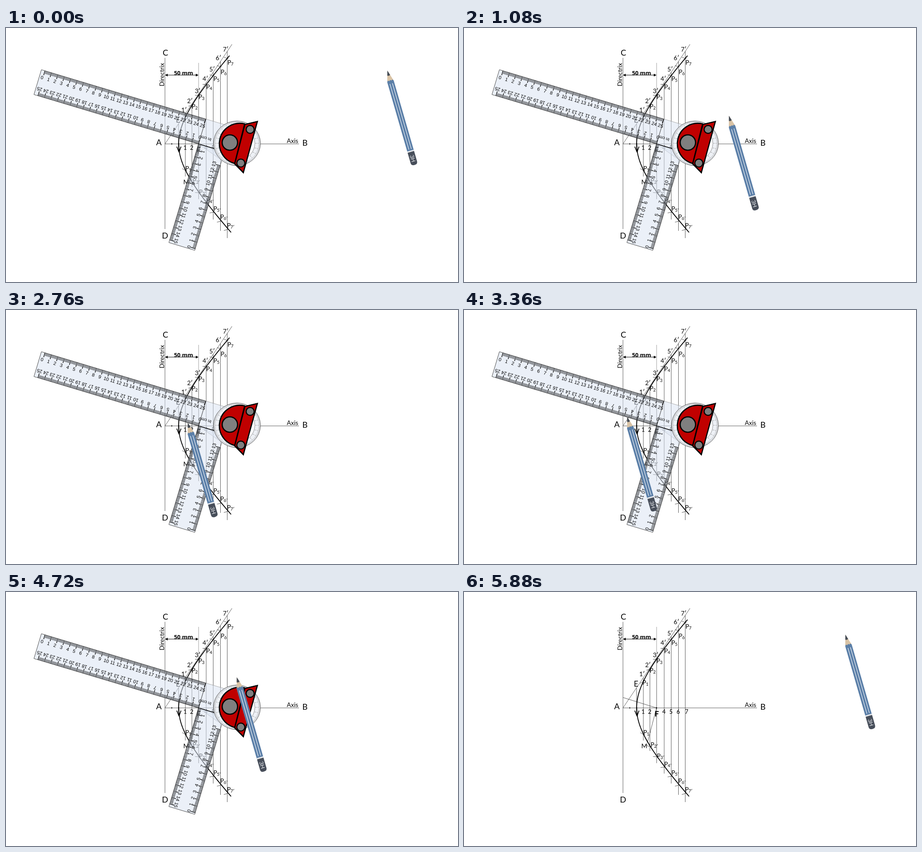
Write an HTML page with a canvas that moves like this. It is 998 by 561 pixels and loops after 5.92 s.

```html
<!DOCTYPE html>
<html lang="en">
<head>
<meta charset="utf-8">
<title>Hyperbola construction</title>
<style>
html, body { margin: 0; width: 100%; height: 100%; overflow: hidden; background: #fff; }
canvas { display: block; width: 998px; height: 561px; }
</style>
</head>
<body>
<canvas id="stage"></canvas>
<script>
const W = 998, H = 561, LOOP = 5920, TOOLS_OFF = 5860;
const TILT = Math.atan(0.3);
const AXIS = 256, DIRECTRIX = 351, FOCUS = 425, ECC = 1.45;
const LABEL = 'Lato, Carlito, sans-serif';
const MARKS = 'Liberation Sans, Arial, sans-serif';

const canvas = document.getElementById('stage');
const ctx = canvas.getContext('2d');
const dpr = window.devicePixelRatio || 1;
canvas.width = W * dpr;
canvas.height = H * dpr;

// Pencil tip: home -> focus -> along the ruler edge to the directrix -> home
const HOME = [842, 94];
const moves = [
  { start: 117, from: HOME, to: [425, 256] },
  { start: 2075, from: [425, 256], to: [351, 233] },
  { start: 4032, from: [351, 233], to: HOME }
];
const MOVE_TIME = 1715;

function ease(u) {
  return u < 0.5 ? 2 * u * u : 1 - 2 * (1 - u) * (1 - u);
}

function tipAt(t) {
  let tip = HOME;
  for (const { start, from, to } of moves) {
    if (t < start) break;
    const k = ease(Math.min(1, (t - start) / MOVE_TIME));
    tip = [from[0] + (to[0] - from[0]) * k, from[1] + (to[1] - from[1]) * k];
  }
  return tip;
}

function trace(points) {
  ctx.beginPath();
  points.forEach(([x, y], i) => i ? ctx.lineTo(x, y) : ctx.moveTo(x, y));
}

function line(x1, y1, x2, y2, color = '#333', width = 0.8) {
  trace([[x1, y1], [x2, y2]]);
  ctx.strokeStyle = color;
  ctx.lineWidth = width;
  ctx.stroke();
}

function shape(points, fill, stroke, width = 1) {
  trace(points);
  ctx.closePath();
  paint(fill, stroke, width);
}

function paint(fill, stroke, width) {
  if (fill) { ctx.fillStyle = fill; ctx.fill(); }
  if (stroke) { ctx.strokeStyle = stroke; ctx.lineWidth = width; ctx.stroke(); }
}

function disc(x, y, r, fill, stroke, width) {
  ctx.beginPath();
  ctx.arc(x, y, r, 0, Math.PI * 2);
  paint(fill, stroke, width);
}

function text(str, x, y, size, { font = LABEL, align = 'center', turn = 0, color = '#000', weight = '' } = {}) {
  ctx.save();
  ctx.translate(x, y);
  ctx.rotate(turn);
  ctx.font = `${weight} ${size}px ${font}`;
  ctx.textAlign = align;
  ctx.textBaseline = 'alphabetic';
  ctx.fillStyle = color;
  ctx.fillText(str, 0, size * 0.36);
  ctx.restore();
}

// Half height of the hyperbola at x
function reach(x) {
  const r = ECC * (x - DIRECTRIX), d = x - FOCUS;
  return Math.sqrt(Math.max(0, r * r - d * d));
}

function branch(side, end) {
  const x0 = (FOCUS + ECC * DIRECTRIX) / (1 + ECC), points = [];
  for (let i = 0; i <= 40; i++) {
    const x = x0 + (end - x0) * (i / 40) ** 2;
    points.push([x, AXIS + side * reach(x)]);
  }
  trace(points);
  paint(null, '#000', 1.8);
}

// x, foot of the ordinate, label n' (x, y), label P (x, y), lower label P' (x, y)
const ordinates = [
  [396, 328, 393, 181, 394, 200, 396, 310],
  [410.5, 351, 406, 161, 410, 173, 412, 337],
  [425.3, 378, 423, 139, 425, 152, 426, 362],
  [442, 401, 440, 112, 442, 130, 442, 380],
  [457.5, 423, 455, 91, 458, 112, 458, 399],
  [473.5, 448, 469, 66, 474, 97, 473, 417],
  [488.5, 464, 485, 47, 489, 76, 488, 436]
];

function pointLabel(x, y, sub) {
  text('P', x, y, 13.5, { align: 'left' });
  text(sub, x + 7.8, y + 4, 9.5, { align: 'left' });
}

function cutArc(x, side) {
  const dx = x - FOCUS, dy = side * reach(x);
  const r = Math.hypot(dx, dy), a = Math.atan2(dy, dx);
  const back = side * 8 / r, ahead = -side * 3 / r;
  ctx.beginPath();
  ctx.arc(FOCUS, AXIS, r, a + Math.min(back, ahead), a + Math.max(back, ahead));
  paint(null, '#333', 0.8);
}

function drawing() {
  line(DIRECTRIX, 66, DIRECTRIX, 444);
  line(DIRECTRIX, AXIS, 647, AXIS);
  line(DIRECTRIX, AXIS, 499, 36);
  line(381, 212, 381, 258);
  line(DIRECTRIX, 233, FOCUS, AXIS);
  line(FOCUS, AXIS, 405, 333);
  line(425.3, 77, 425.3, 150, '#888');

  ordinates.forEach(([x, foot, nx, ny, px, py, qx, qy], i) => {
    const n = i + 1;
    line(x, AXIS - 1.486 * (x - DIRECTRIX), x, foot);
    cutArc(x, -1);
    cutArc(x, 1);
    text(n + '′', nx, ny, 13.5);
    pointLabel(px, py, String(n));
    pointLabel(qx, qy, n + '′');
    if (n !== 3) text(String(n), x + (n > 6 ? 3 : -0.5), 264, 13);
  });

  ctx.lineJoin = 'round';
  branch(-1, 493.5);
  ctx.save();
  ctx.translate(0, AXIS);
  ctx.scale(1, 0.982);
  ctx.translate(0, -AXIS);
  branch(1, 497);
  ctx.restore();
  line(381.3, 254, 382, 274, '#000', 1.8);
  trace([[377, 262], [382, 274], [386.5, 262]]);
  paint(null, '#000', 1.8);

  line(353, 104, 423, 104, '#000', 1);
  shape([[351, 104], [357, 101], [357, 107]], '#000');
  shape([[425, 104], [419, 101], [419, 107]], '#000');
  disc(366, AXIS, 1.2, '#000');
  disc(FOCUS, AXIS, 1.4, '#000');

  text('50 mm', 392, 99, 12.5, { font: 'Open Sans, sans-serif', weight: 'bold' });
  text('Directrix', 344, 103, 13.5, { turn: -Math.PI / 2 });
  text('Axis', 632.5, 249, 13.5);
  text('A', 337.5, 253, 18);
  text('B', 660, 254, 18);
  text('C', 352, 55, 18);
  text('D', 351, 459, 18);
  text('E', 380, 203, 17);
  text('F', 425.5, 268.5, 17, { weight: 'bold' });
  text('M', 398, 340, 14);
}

// A scale running along +x from the origin, ticks growing toward "grow"
function scale(cm, unit, grow, numberAt, shift, turn = 0) {
  for (let i = 0; i <= cm * 5; i++) {
    const len = i % 5 ? 6.5 : 10;
    line(i * unit / 5, 0, i * unit / 5, grow * len, '#000', i % 5 ? 1.1 : 1.4);
  }
  for (let n = 0; n <= cm; n++) {
    text(String(n), n * unit + shift, numberAt, 10.5, { font: MARKS, turn });
  }
}

function placed(x, y, turn, draw) {
  ctx.save();
  ctx.translate(x, y);
  ctx.rotate(turn);
  draw();
  ctx.restore();
}

function rulers() {
  const glass = 'rgba(218,227,243,0.55)';
  placed(FOCUS, AXIS, TILT, () => {
    shape([[0, -57.3], [60, -57.3], [60, 20], [59.5, 20], [0, 0]], glass, '#888', 0.6);
    shape([[-379.3, -57.3], [0, -57.3], [0, 0], [-379.3, 0]], glass, '#333', 0.8);
    shape([[0, 0], [59.7, 0], [59.7, 227.5], [0, 227.5]], glass, '#333', 0.8);
    line(0, 0, 40, 0, '#000', 1.4);

    placed(-371, -57.3, 0, () => scale(25, 14.8, 1, 16, -2));
    placed(0, 0, Math.PI, () => scale(25, 14.8, 1, 15, 1));
    text('In cm', 13, -16.5, 9.5, { font: MARKS, turn: Math.PI });
    placed(0, 0, Math.PI / 2, () => {
      for (let i = 1; i <= 75; i++) {
        line(i * 2.95, 0, i * 2.95, i % 5 ? -6.5 : -10, '#000', i % 5 ? 1.1 : 1.4);
      }
      for (let n = 1; n <= 15; n++) text(String(n), n * 14.7 - 1, -14.5, 10.5, { font: MARKS });
    });
    placed(59.7, 223.5, -Math.PI / 2, () => scale(13, 14.7, -1, -14.7, 0));
  });
}

function head() {
  ctx.save();
  ctx.translate(510, 254.7);
  ctx.scale(1, 0.952);
  disc(0, 0, 51.8, '#eef1f6', '#555', 1);
  for (let i = 0; i < 120; i++) {
    const a = i * Math.PI / 60, r = i % 5 ? 47.5 : 45;
    const c = Math.cos(a), s = Math.sin(a);
    line(c * r, s * r, c * 51, s * 51, '#888', 0.7);
    if (i % 5 === 0) line(c * 41, s * 41, c * 43, s * 43, '#999', 1.4);
  }
  disc(0, 0, 39.5, '#fbfcfe', '#777', 0.8);
  ctx.restore();

  ctx.lineJoin = 'miter';
  const a = Math.atan2(-44, 11);
  ctx.beginPath();
  ctx.arc(516, 255.5, 45, a + Math.PI, a + Math.PI * 2);
  ctx.closePath();
  paint('#c00000', '#000', 2.6);
  shape([[527.5, 213], [555, 206.5], [524, 319.5], [505, 300]], '#c00000', '#000', 2.6);
  disc(494.3, 253, 17, '#7f7f7f', '#000', 2.6);
  disc(539, 224, 8.8, '#7f7f7f', '#000', 2.4);
  disc(518.5, 298.3, 8.8, '#7f7f7f', '#000', 2.4);
}

// Drawn with the tip at the origin and the body running along +y
function pencil([x, y]) {
  placed(x, y, -0.281, () => {
    shape([[0, 0], [7.4, 25], [-7.4, 25]], '#d9c3a5');
    shape([[0, 0], [3.3, 11], [0, 12], [-3.3, 11]], '#454c55');
    ctx.beginPath();
    ctx.moveTo(-7.4, 25);
    ctx.quadraticCurveTo(-5, 20, -2.5, 24);
    ctx.quadraticCurveTo(0, 20, 2.5, 24);
    ctx.quadraticCurveTo(5, 20, 7.4, 25);
    ctx.lineTo(7.4, 185);
    ctx.lineTo(-7.4, 185);
    ctx.closePath();
    paint('#5b7fa8');
    line(-2.7, 30, -2.7, 181, '#e9eef4', 1.3);
    line(2.9, 30, 2.9, 181, '#e9eef4', 1.3);
    ctx.fillStyle = '#e4e7eb';
    ctx.fillRect(-7.4, 184, 14.8, 3);
    ctx.beginPath();
    ctx.moveTo(-7.4, 187);
    ctx.lineTo(7.4, 187);
    ctx.lineTo(7.4, 211);
    ctx.quadraticCurveTo(7.4, 217, 0, 217);
    ctx.quadraticCurveTo(-7.4, 217, -7.4, 211);
    ctx.closePath();
    paint('#474e5a');
    text('3H', 0, 202, 12.5, { font: MARKS, turn: Math.PI / 2, color: '#e6e8ec' });
  });
}

function render(t) {
  ctx.setTransform(dpr, 0, 0, dpr, 0, 0);
  ctx.fillStyle = '#fff';
  ctx.fillRect(0, 0, W, H);
  drawing();
  if (t < TOOLS_OFF) {
    rulers();
    head();
  }
  pencil(tipAt(t));
}

const begin = performance.now();
function tick() {
  render((performance.now() - begin) % LOOP);
  requestAnimationFrame(tick);
}
tick();
</script>
</body>
</html>
```
